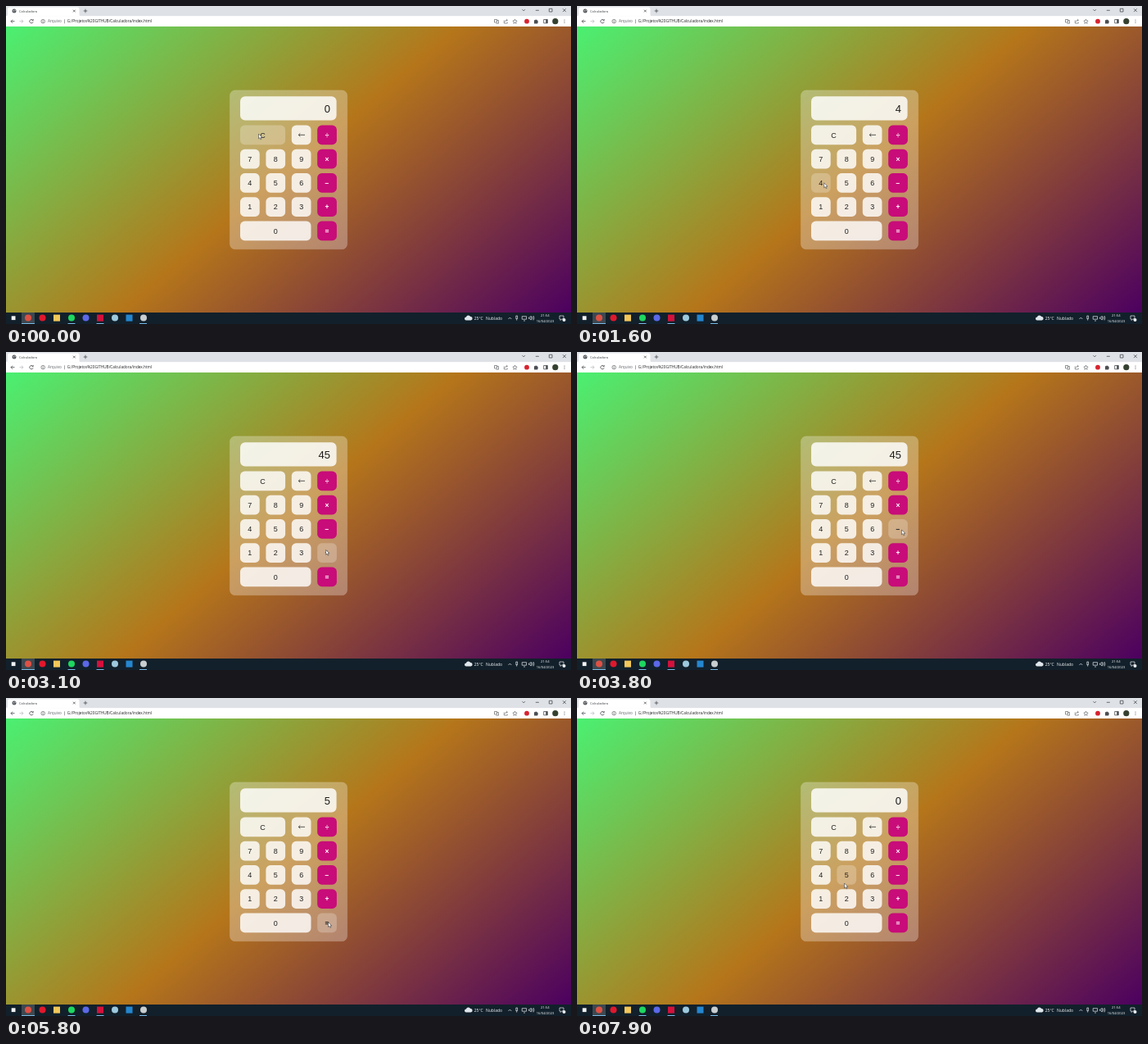
Animation, 690 px wide and 388 px high, one loop 8 s. Source, as an HTML page:

```html
<!DOCTYPE html>
<html lang="pt">
<head>
<meta charset="utf-8">
<title>Calculadora</title>
<style>
html, body { margin: 0; width: 100%; height: 100%; overflow: hidden; background: #fff; }
#stage { position: relative; width: 690px; height: 388px; overflow: hidden; }
#page {
  position: absolute; top: 25px; width: 690px; height: 349px;
  background: linear-gradient(140deg, #4af072, #b5761a 50%, #4c0060);
}
svg { position: absolute; left: 0; top: 0; }
.ui { font-family: "Open Sans", "Noto Sans", sans-serif; }
.line { fill: none; stroke: #4a4d51; stroke-width: .8; }
.tray { fill: none; stroke: #e8eaec; stroke-width: .7; }
.key { --h: 0%; }
.key rect { fill: color-mix(in srgb, rgb(255 255 255 / .24) var(--h), var(--face)); }
.key text { fill: color-mix(in srgb, #222 var(--h), var(--ink)); }
.num { --face: rgb(255 255 255 / .82); --ink: #222; font-size: 9px; }
.op { --face: #c80c79; --ink: #fff; font-size: 8.5px; font-weight: 700; }
.calc { font-family: "Liberation Sans", Arial, sans-serif; }
</style>
</head>
<body>
<div id="stage">
<div id="page"></div>
<svg width="690" height="388" viewBox="0 0 690 388">
  <!-- browser bar -->
  <g class="ui">
    <rect width="690" height="12.5" fill="#dee1e6"/>
    <path d="M0 12.5Q2 12.5 2 10V4Q2 1.5 4.500 1.5H87Q89.500 1.500 89.500 4V10Q89.500 12.500 92 12.500Z" fill="#fff"/>
    <rect y="12.300" width="690" height="12.700" fill="#fff"/>
    <circle cx="10" cy="6" r="2.500" fill="#55595e"/>
    <path d="M8.500 5.200l1.500.4-.6 1.500M10.800 4.200l.9 1.800" class="line" style="stroke:#fff;stroke-width:.5"/>
    <text x="16" y="7.600" font-size="4" fill="#3c4043">Calculadora</text>
    <path class="line" d="M82 4.700l2.700 2.700m0-2.700l-2.700 2.700M94.700 6h4.600M97 3.700v4.600"/>
    <path class="line" d="M630.500 4.200l1.700 1.700 1.700-1.700M646.800 5.300h4M663.300 3.300h3.700v3.700h-3.700zM680 3.300l3.800 3.800m0-3.800l-3.800 3.800"/>
    <path class="line" d="M10.500 18.700H6m2.100-2.100L6 18.700l2.100 2.100"/>
    <path class="line" style="stroke:#b9bcc0" d="M16.500 18.700H21m-2.100-2.100l2.100 2.100-2.100 2.100"/>
    <path class="line" d="M32.800 17.400a2.200 2.200 0 1 0 .3 2M33.200 16v1.700h-1.700"/>
    <circle class="line" cx="45.200" cy="18.700" r="2.300" style="stroke-width:.6"/>
    <path class="line" d="M45.200 17.300v.6m0 .5v1.700" style="stroke-width:.7"/>
    <g font-size="4.700">
      <text x="51" y="20.400" fill="#5f6368">Arquivo</text>
      <path d="M71.500 16.300v5" class="line" style="stroke-width:.5"/>
      <text x="74.800" y="20.400" fill="#202124">G:/Projetos%20GITHUB/Calculadora/index.html</text>
    </g>
    <path class="line" style="stroke-width:.6" d="M596.500 16.500h3v3.500h-3zM599.500 17.500h2v3.700h-3M608.300 17.500v3.500h4v-1.200M609.500 19.200q.4-2 2.700-2m-1-1.200l1.200 1.200-1.200 1.200"/>
    <path class="line" style="stroke-width:.6" d="M621.500 16.200l.8 1.700 1.800.2-1.300 1.300.3 1.900-1.600-.9-1.600.9.300-1.900-1.300-1.300 1.800-.2z"/>
    <circle cx="636" cy="18.700" r="2.900" fill="#d8232f"/>
    <path d="M645 17.300h1.300a.9.900 0 0 1 1.800 0h1.200v1.300a.9.900 0 0 1 0 1.700v1.200H645z" fill="#4a4d51"/>
    <path class="line" d="M656.700 16.500h4.600v4.400h-4.600z"/>
    <path d="M659.200 16.500h2.100v4.400h-2.100z" fill="#4a4d51"/>
    <circle cx="670.800" cy="18.700" r="3.600" fill="#35402f"/>
    <path d="M682 16.500v.9m0 .9v.9m0 .9v.9" class="line"/>
  </g>

  <!-- task bar -->
  <rect y="374" width="690" height="14" fill="#12202b"/>
  <rect x="19" y="374" width="16" height="14" fill="#3d4850"/>
  <rect x="6.700" y="378.300" width="4.800" height="4.800" fill="#f2f4f5"/>
  <g id="apps"></g>
  <path d="M19 387.500h16M75.500 387.500h9M110.500 387.500h9M163 387.500h9" stroke="#77b9e6"/>
  <path d="M562 383.500a2 2 0 0 1 0-4 2.800 2.800 0 0 1 5.200-.4 2.200 2.200 0 0 1 .4 4.400z" fill="#dfe6ec"/>
  <g class="ui" fill="#f4f5f6">
    <text x="571.700" y="382.700" font-size="5">25°C</text>
    <text x="586" y="382.700" font-size="5">Nublado</text>
    <g text-anchor="middle" font-size="4.200">
      <text x="658.300" y="379.300">21:54</text>
      <text x="658.500" y="385.700" font-size="4.100">16/04/2023</text>
    </g>
  </g>
  <path class="tray" d="M613.500 382l1.900-1.900 1.900 1.900M622.800 378h1.800v3.600h-1.800zM623.700 381.600v2M630.200 378.700h5.400v3.500h-5.400zM632 384h2M638.500 380h1l1.700-1.700v4.800l-1.700-1.700h-1zM642.500 379q1.200 1.700 0 3.400M644 378q1.800 2.700 0 5.400M676 378h5v4h-2.500l-1.300 1.500V382H676z"/>
  <circle cx="681.500" cy="383" r="2" fill="#e9ecee"/>

  <!-- calculator -->
  <g class="calc" text-anchor="middle">
    <rect x="273.300" y="102.800" width="143.500" height="194" rx="6.500" fill="#fff" fill-opacity=".3" stroke="#fff" stroke-opacity=".12" stroke-width=".7"/>
    <rect x="286" y="110.300" width="117.600" height="29.300" rx="6" fill="#fff" fill-opacity=".83"/>
    <text id="screen" x="396" y="129.700" font-size="13" text-anchor="end" fill="#1c1c1c"></text>
    <g id="keys"></g>
    <path d="M365 157.300h-7.700m2-1.900l-2 1.900 2 1.900" fill="none" stroke="#222" stroke-width=".75"/>
  </g>
  <path id="cursor" d="M0 0V5.900L1.400 4.700 2.400 6.900 3.400 6.500 2.500 4.300H4.300Z" fill="#fff" stroke="#333" stroke-width=".55"/>
</svg>
</div>
<script>
const LOOP = 8000, STEP = 100;
const $ = id => document.getElementById(id);

function add(parent, tag, attrs, text = '') {
  const el = document.createElementNS('http://www.w3.org/2000/svg', tag);
  for (const k in attrs) el.setAttribute(k, attrs[k]);
  el.textContent = text;
  return parent.appendChild(el);
}

// taskbar programs: x, colour, round corners
[[27, '#dd5144', 4], [44.5, '#e0182d', 4], [62, '#f2c75a', 0], [80, '#1ed760', 4], [97.5, '#5b68e8', 4],
 [115, '#d3113c', 0], [133, '#9cc9dd', 4], [150.5, '#2586cf', 0], [168, '#c9ced0', 4]]
  .forEach(([x, fill, rx]) => add($('apps'), 'rect', { x: x - 4, y: 376.6, width: 8, height: 8, rx, fill }));

// each key: label and column span
const rows = [
  [['C', 2], ['', 1], ['÷', 1]],
  [['7', 1], ['8', 1], ['9', 1], ['×', 1]],
  [['4', 1], ['5', 1], ['6', 1], ['−', 1]],
  [['1', 1], ['2', 1], ['3', 1], ['+', 1]],
  [['0', 3], ['=', 1]]
];
const keys = [];
rows.forEach((row, r) => {
  let col = 0;
  for (const [label, span] of row) {
    const x = 286 + col * 31.4, y = 145.6 + r * 29.25;
    const width = 23.7 + (span - 1) * 31.4, height = 23.6;
    const el = add($('keys'), 'g', { class: 'key ' + (col === 3 ? 'op' : 'num') });
    add(el, 'rect', { x, y, width, height, rx: 5.5 });
    add(el, 'text', { x: x + width / 2, y: y + 14.9 }, label);
    keys.push({ el, x, y, width, height });
    col += span;
  }
});

// pointer path: time, x, y
const path = [
  [0, 308.5, 156], [500, 309, 157], [1200, 301, 215], [1600, 301.7, 215.8], [1800, 316, 215],
  [2000, 328, 214], [2150, 330, 214], [2400, 362, 222], [2500, 370.7, 230.3], [2700, 384, 252],
  [3000, 390, 245], [3400, 394, 222], [3700, 396.5, 217], [4100, 396.2, 216.6],
  [4900, 328, 216], [5200, 328, 217], [5800, 393.5, 273.5], [6400, 393.5, 273.5],
  [7200, 320, 158], [7400, 320, 158], [7900, 326.5, 226]
];
const shown = [[0, '0'], [1400, '4'], [2100, '45'], [5000, '5'], [6000, '40'], [7400, '0']];

function pointer(t) {
  const i = path.findIndex(p => p[0] > t);
  if (i < 0) return path.at(-1).slice(1);
  if (i === 0) return path[0].slice(1);
  const [t0, x0, y0] = path[i - 1], [t1, x1, y1] = path[i];
  const u = (t - t0) / (t1 - t0), e = u * u * (3 - 2 * u);
  return [x0 + (x1 - x0) * e, y0 + (y1 - y0) * e];
}

// key shade fades as the share of recent time spent over it
const TRAIL = [0, 30, 60, 90, 120, 150];

function draw(t) {
  const [x, y] = pointer(t);
  $('cursor').setAttribute('transform', `translate(${x} ${y})`);
  $('screen').textContent = shown.findLast(s => s[0] <= t)[1];
  const trail = TRAIL.map(d => pointer(Math.max(0, t - d)));
  for (const k of keys) {
    const hits = trail.filter(([px, py]) =>
      px >= k.x && px <= k.x + k.width && py >= k.y && py <= k.y + k.height).length;
    k.el.style.setProperty('--h', hits / TRAIL.length * 100 + '%');
  }
}

const start = performance.now();
function tick() {
  const t = (performance.now() - start) % LOOP;
  draw(Math.floor(t / STEP) * STEP);
  requestAnimationFrame(tick);
}
tick();
</script>
</body>
</html>
```
